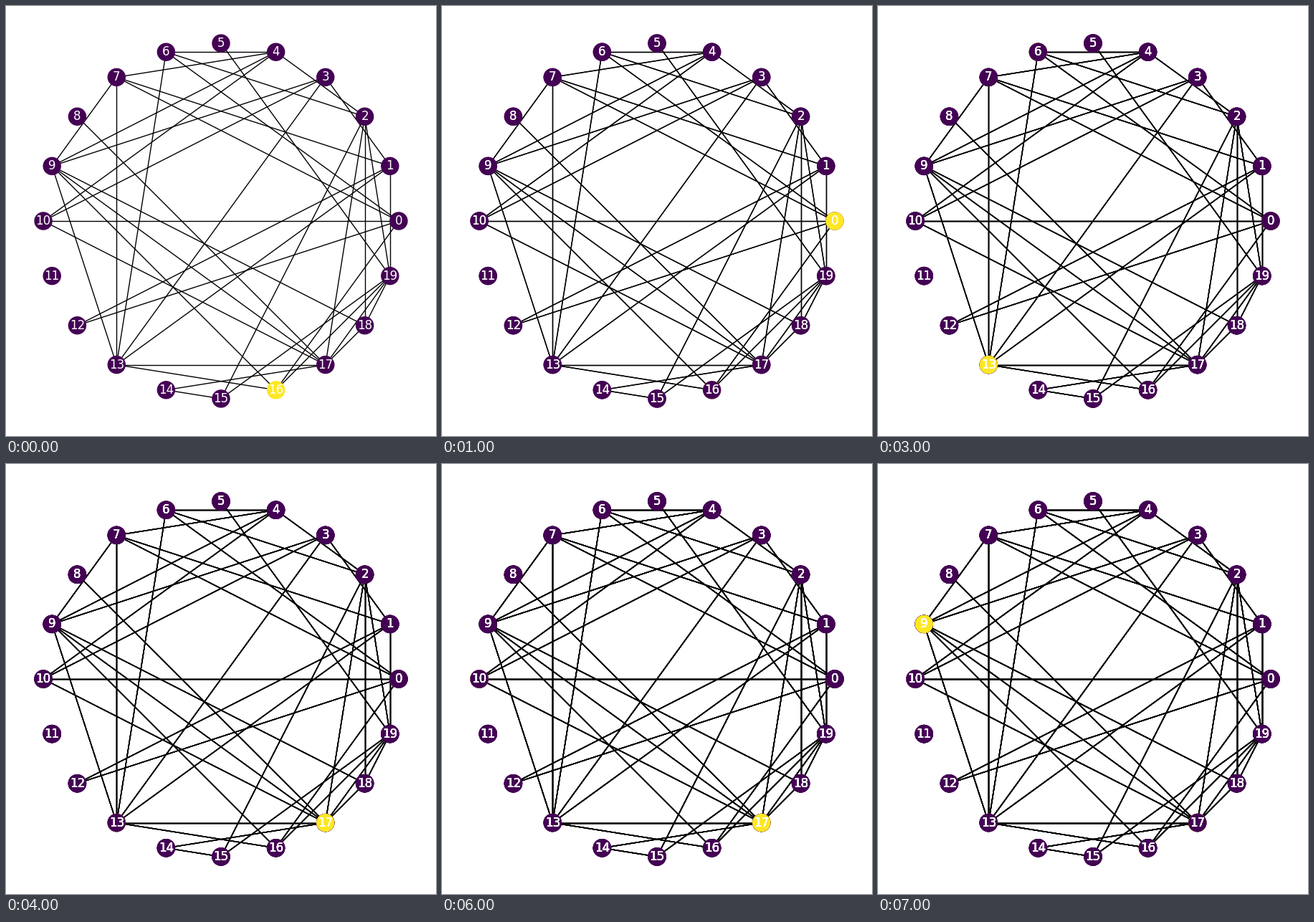
Write a matplotlib script that moves like this. It is 600x600 px and loops after 8000 ms.

```python
import matplotlib.pyplot as plt
import numpy as np
from matplotlib.animation import FuncAnimation
from matplotlib.collections import LineCollection

N = 20
WALK = [16, 0, 6, 13, 17, 10, 17, 9]  # highlighted node at each step

# The graph as a few continuous strokes from node to node.
STROKES = [
    "5 19 1 12 0 16 19 15 14 17 8",
    "15 2 19 17 18 2 17 13 16 9 18 19",
    "0 10 17 9 4 10 3 13 6 2 4",
    "1 7 0 6 4 7 9 13",
    "9 3 1 13 7",
]

plt.rcParams["font.family"] = "DejaVu Sans"
fig = plt.figure(figsize=(6, 6), dpi=100, facecolor="white")
ax = fig.add_axes([0, 0, 1, 1])
ax.set_axis_off()

angle = 2 * np.pi * np.arange(N) / N
pos = np.column_stack([np.cos(angle), np.sin(angle)])


def stroke_edges(stroke):
    path = [int(node) for node in stroke.split()]
    return zip(path, path[1:])


# Sorted so that every edge runs from its lower to its higher node.
edges = sorted(tuple(sorted(e)) for s in STROKES for e in stroke_edges(s))
segments = [pos[list(e)] for e in edges]


def draw_graph(active):
    """Draw the whole graph once and return its artists."""
    lines = LineCollection(segments, colors="black", linewidths=1, zorder=1)
    ax.add_collection(lines)
    nodes = ax.scatter(*pos.T, s=300, c=np.arange(N) == active,
                       cmap="viridis", vmin=0, vmax=1, zorder=2)
    labels = [ax.text(x, y, str(i), size=12, color="white",
                      ha="center", va="center", zorder=3)
              for i, (x, y) in enumerate(pos)]
    return [lines, nodes, *labels]


# Each step paints over the earlier ones, so soft edges slowly darken.
layers = [draw_graph(node) for node in WALK]
ax.set_xlim(-1.21, 1.21)
ax.set_ylim(-1.21, 1.21)


def update(step):
    for i, layer in enumerate(layers):
        for artist in layer:
            artist.set_visible(i <= step)


anim = FuncAnimation(fig, update, frames=len(WALK), interval=1000,
                     repeat=True, repeat_delay=0, blit=False)
plt.show()
```
